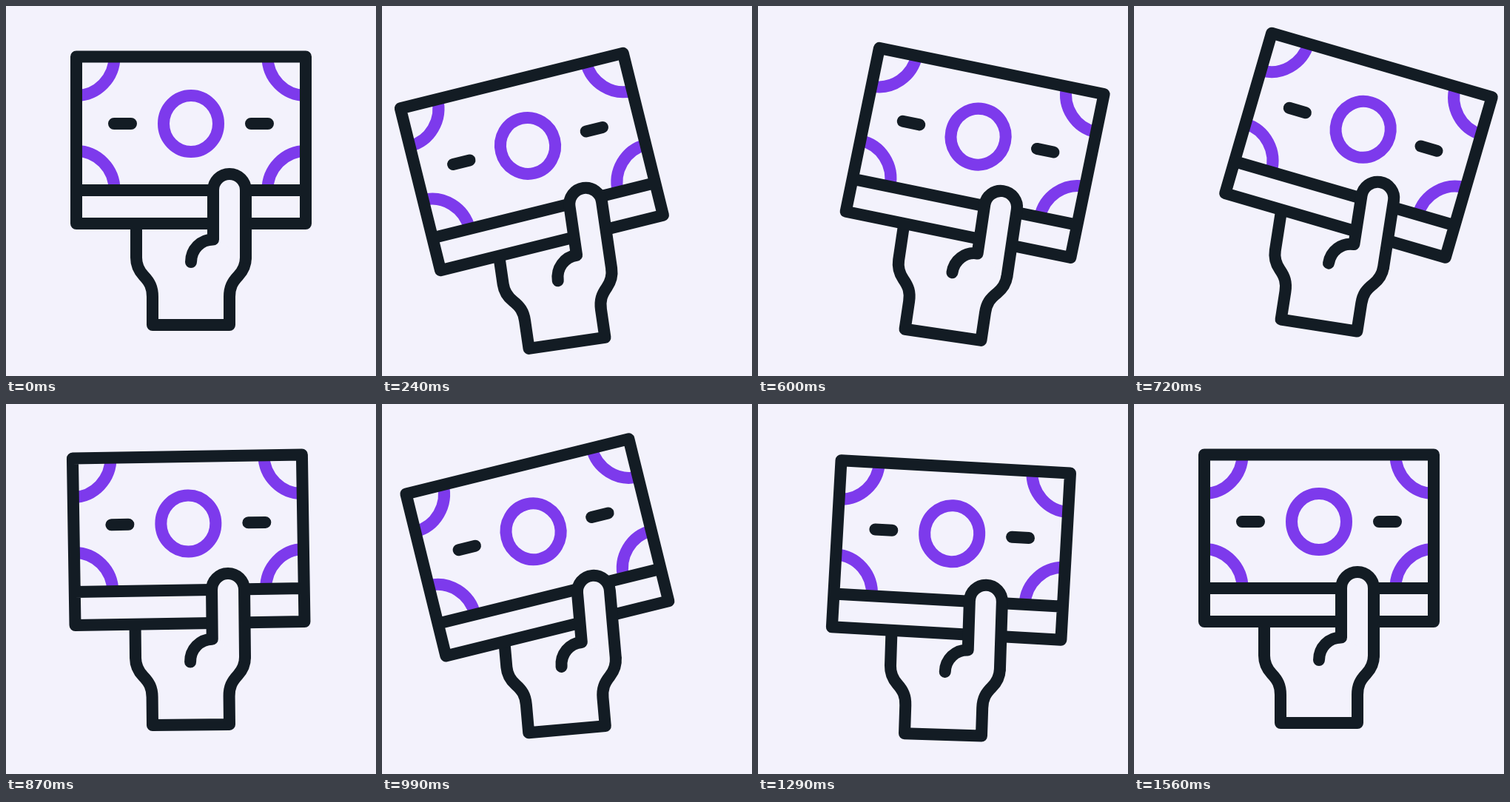
These frames come from a looping animation (500 by 500 pixels, 1.8 s). An HTML page:

```html
<!DOCTYPE html>
<html lang="en">
<head>
<meta charset="utf-8">
<title>Cash in hand</title>
<style>
  html, body { margin: 0; width: 100%; height: 100%; overflow: hidden; background: #f3f2fc; }
  svg { display: block; width: 100%; height: 100%; }
  svg * { stroke-width: 16; stroke-linejoin: round; }
  .ink { fill: none; stroke: #131c24; }
  .paper { fill: #f3f2fc; stroke: none; }
  .accent { fill: none; stroke: #7d3aec; }
  .round { stroke-linecap: round; }
</style>
</head>
<body>
<svg viewBox="0 0 500 500">
  <g id="hand">
    <path class="ink" d="M176 276V340C176 350 179 357 186 364.500C194 373 198 380 198 393V431H302V393C302 380 306 373 314 364.500C321 357 324 350 324 340"/>
    <g id="bill">
      <rect class="paper" x="95" y="68" width="310" height="226"/>
      <g class="accent">
        <path d="M146.600 68A51.600 53 0 0 1 95 121"/>
        <path d="M353.400 68A51.600 53 0 0 0 405 121"/>
        <path d="M95 196A51.600 53 0 0 1 146.600 249"/>
        <path d="M405 196A51.600 53 0 0 0 353.400 249"/>
        <ellipse cx="250" cy="159" rx="37" ry="38"/>
      </g>
      <rect class="paper" x="95" y="249" width="310" height="45"/>
      <path class="ink" d="M95 68.500H405V294H95ZM95 249H405"/>
      <path class="ink round" d="M146 159H169M331 159H354"/>
    </g>
    <path class="paper" d="M324 340V249A22 22 0 0 0 280 249V315Z"/>
    <path class="ink round" d="M324 340V249A22 22 0 0 0 280 249V315.500C263 315.500 250 329 250 346"/>
  </g>
</svg>
<script>
  const STEP = 30, LOOP = 1800, LAST = 52;

  // [step, value] keys, eased in and out between neighbours
  const drop = [[0, 0], [13, 36], [25, 0], [41, 17.3], [52, 0]];
  const sway = [[0, 0], [11, -10], [22, 10], [33, -5], [44, 2], [52, 0]];
  const tilt = [[0, 0], [12.6, -8], [24, 7.4], [34.8, -10], [45, 2.5], [52, 0]];

  const hand = document.getElementById('hand');
  const bill = document.getElementById('bill');

  function valueAt(keys, s) {
    let i = 1;
    while (i < keys.length - 1 && s > keys[i][0]) i++;
    const [s0, v0] = keys[i - 1], [s1, v1] = keys[i];
    const p = (s - s0) / (s1 - s0);
    return v0 + (v1 - v0) * (1 - Math.cos(Math.PI * p)) / 2;
  }

  function draw(ms) {
    const s = Math.min(LAST, Math.floor(ms % LOOP / STEP));
    hand.setAttribute('transform',
      `translate(0 ${valueAt(drop, s)}) rotate(${valueAt(sway, s)} 250 431)`);
    bill.setAttribute('transform', `rotate(${valueAt(tilt, s)} 250 302)`);
  }

  const start = performance.now();
  function tick() {
    draw(performance.now() - start);
    requestAnimationFrame(tick);
  }
  tick();
</script>
</body>
</html>
```
